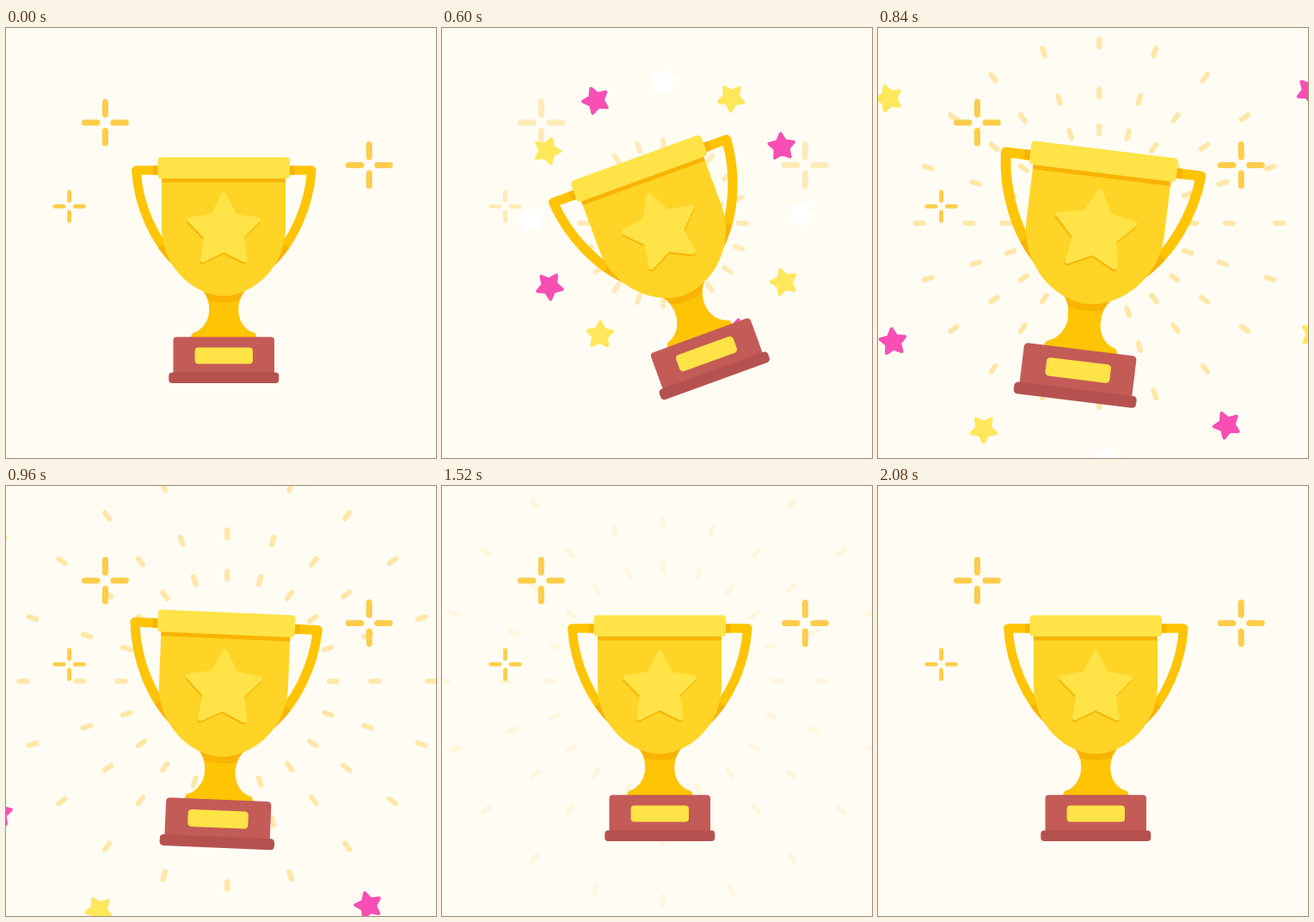
These frames come from a looping animation (500x500 px, 2600 ms). An HTML page:

```html
<!DOCTYPE html>
<html lang="en">
<head>
<meta charset="utf-8">
<title>Trophy</title>
<style>
  html, body { margin: 0; width: 100%; height: 100%; overflow: hidden; background: #fffcf4; }
  svg { display: block; width: 100vw; height: 100vh; }
  .gold { fill: #ffc403; }
  .dark { fill: #f8b303; }
  .light { fill: #ffe347; }
  .handle { fill: none; stroke: #ffc403; stroke-width: 10.5; stroke-linejoin: round; }
  .shade { stroke: #f8b303; stroke-dasharray: 0 81 25; }
  #rays { stroke: #ffe7a8; stroke-width: 6; stroke-linecap: round; }
  #sparkles { stroke: #ffcd4b; stroke-width: 7; stroke-linecap: round; fill: none; }
  #stars { stroke-width: 4; stroke-linejoin: round; }
  .badge { stroke-width: 6; stroke-linejoin: round; }
</style>
</head>
<body>
<svg viewBox="0 0 500 500">
  <defs>
    <g id="handle">
      <path class="handle" d="M182 165.5H151.3C154 206 172 249 201 275"/>
      <path class="handle shade" pathLength="100" d="M182 165.5H151.3C154 206 172 249 201 275"/>
      <path class="dark" d="M171 160.2h10v10.6h-10z"/>
    </g>
    <path id="sparkle" d="M0-24V-9.5M0 9.5V24M-24 0H-9.5M9.5 0H24"/>
    <filter id="soft" x="-10%" y="-10%" width="120%" height="120%">
      <feGaussianBlur stdDeviation="3"/>
    </filter>
    <mask id="glow" maskUnits="userSpaceOnUse" x="0" y="0" width="500" height="500" style="mask-type:alpha">
      <use href="#trophy" filter="url(#soft)"/>
    </mask>
  </defs>

  <g id="rays" transform="translate(257.2 226.9)"></g>
  <g id="sparkles">
    <use href="#sparkle" transform="translate(115.4 110)"/>
    <use href="#sparkle" transform="translate(422.3 159.5)"/>
    <use href="#sparkle" transform="translate(73.6 207.4) scale(.7)"/>
  </g>
  <g id="stars" transform="translate(260 219.2) rotate(-1)"></g>

  <g id="trophy">
    <use href="#handle"/>
    <use href="#handle" transform="translate(506.6 0) scale(-1 1)"/>
    <path class="gold" d="M228 304C235 313 237 322 236 332C234 344 226 352 219 354Q215 355 215 361H291.5Q291.5 355 288 354C280 352 272 344 270.5 332C269.5 322 272 313 279 304Z"/>
    <path class="dark" d="M228 304C233 311 235 315 235.4 316.5Q253 321 271 316.5C272 314 275 309 279 304Z"/>
    <path fill="#ffd426" d="M181 170H325V232C325 280 285 311.5 253 311.5S181 280 181 232Z"/>
    <path class="dark" d="M181 170h144v9.5h-144z"/>
    <rect class="light" x="176.5" y="150.2" width="153.5" height="24.8" rx="4"/>
    <polygon class="badge dark" stroke="#f8b303" transform="translate(252.7 238)"/>
    <polygon class="badge light" stroke="#ffe347" transform="translate(253.2 236)"/>
    <rect x="194.5" y="359.3" width="117.5" height="46" rx="4" fill="#c35b57"/>
    <rect x="189.3" y="400.6" width="128" height="12.4" rx="4" fill="#b5524f"/>
    <rect class="light" x="219.6" y="371.4" width="67.4" height="19.2" rx="4"/>
  </g>

  <g mask="url(#glow)">
    <path id="sheen" d="M110-64.7L410 129.4V289.4L110 95.3Z" fill="#fff8df" opacity=".32"/>
  </g>
</svg>
<script>
const LOOP = 2600, STEP = 40;
const NS = 'http://www.w3.org/2000/svg';
const $ = id => document.getElementById(id);

function add(parent, tag, attrs) {
  const el = document.createElementNS(NS, tag);
  for (const key in attrs) el.setAttribute(key, attrs[key]);
  return parent.appendChild(el);
}

function starPoints(outer, inner) {
  return Array.from({ length: 10 }, (_, i) => {
    const r = i % 2 ? inner : outer, a = i * Math.PI / 5;
    return [r * Math.sin(a), -r * Math.cos(a)].map(n => n.toFixed(2)).join();
  }).join(' ');
}

document.querySelectorAll('.badge').forEach(el => el.setAttribute('points', starPoints(41.5, 21.5)));

// Twenty spokes of three dashes each.
const dashes = [];
for (let i = 0; i < 20; i++) {
  for (const ring of [1, .722, .518]) {
    dashes.push({ ring, angle: i * 18, el: add($('rays'), 'line', { y1: -4.5, y2: 4.5 }) });
  }
}

const colors = ['#ffffff', '#ffe75c', '#f84fb4'];
const stars = Array.from({ length: 12 }, (_, i) => ({
  angle: i * 30,
  el: add($('stars'), 'polygon', { points: starPoints(15, 7.8), fill: colors[i % 3], stroke: colors[i % 3] })
}));

const progress = (t, from, to) => Math.min(1, Math.max(0, (t - from) / (to - from)));
const smooth = u => u * u * (3 - 2 * u);
const burst = (t, from) => 1 - Math.pow(1 - progress(t, from, 1240), 2.7);

// Keys are [time, value] pairs.
function track(keys, t) {
  for (let i = 1; i < keys.length; i++) {
    const [t0, v0] = keys[i - 1], [t1, v1] = keys[i];
    if (t < t1) return v0 + (v1 - v0) * smooth(progress(t, t0, t1));
  }
  return keys[keys.length - 1][1];
}

const scaleKeys = [[340, 0], [600, 1.05], [720, 1.12], [840, 1.12], [1040, 1]];
const turnKeys = [[340, 0], [600, -20], [840, 7], [1040, 0]];

function draw(t) {
  const intro = t < 320;
  const size = intro ? 1 : t < 400 ? 0 : track(scaleKeys, t);
  const turn = intro ? 0 : track(turnKeys, t);
  $('trophy').setAttribute('visibility', size ? 'visible' : 'hidden');
  $('trophy').setAttribute('transform',
    `translate(253 230) rotate(${turn}) scale(${size || 1}) translate(-253 -230)`);

  $('sparkles').setAttribute('opacity', intro ? 1 : progress(t, 520, 740));

  $('rays').setAttribute('opacity', progress(t, 470, 640) * (1 - progress(t, 1320, 1600)));
  const reach = 255 * burst(t, 484);
  for (const d of dashes) {
    d.el.setAttribute('transform', `rotate(${d.angle}) translate(0 ${-reach * d.ring})`);
  }

  const out = burst(t, 428);
  const grow = progress(t, 420, 560);
  $('stars').setAttribute('visibility', t >= 440 && t < 1400 ? 'visible' : 'hidden');
  for (const s of stars) {
    s.el.setAttribute('transform',
      `rotate(${s.angle}) translate(0 ${-332 * out}) rotate(${90 * out - 34}) scale(${grow})`);
  }

  $('sheen').setAttribute('visibility', t >= 1520 && t < 2080 ? 'visible' : 'hidden');
  $('sheen').setAttribute('transform', `translate(0 ${178 - (t - 1800) * 1.18})`);
}

const start = performance.now();
function tick() {
  const t = (performance.now() - start) % LOOP;
  draw(Math.floor(t / STEP) * STEP);
  requestAnimationFrame(tick);
}
tick();
</script>
</body>
</html>
```
